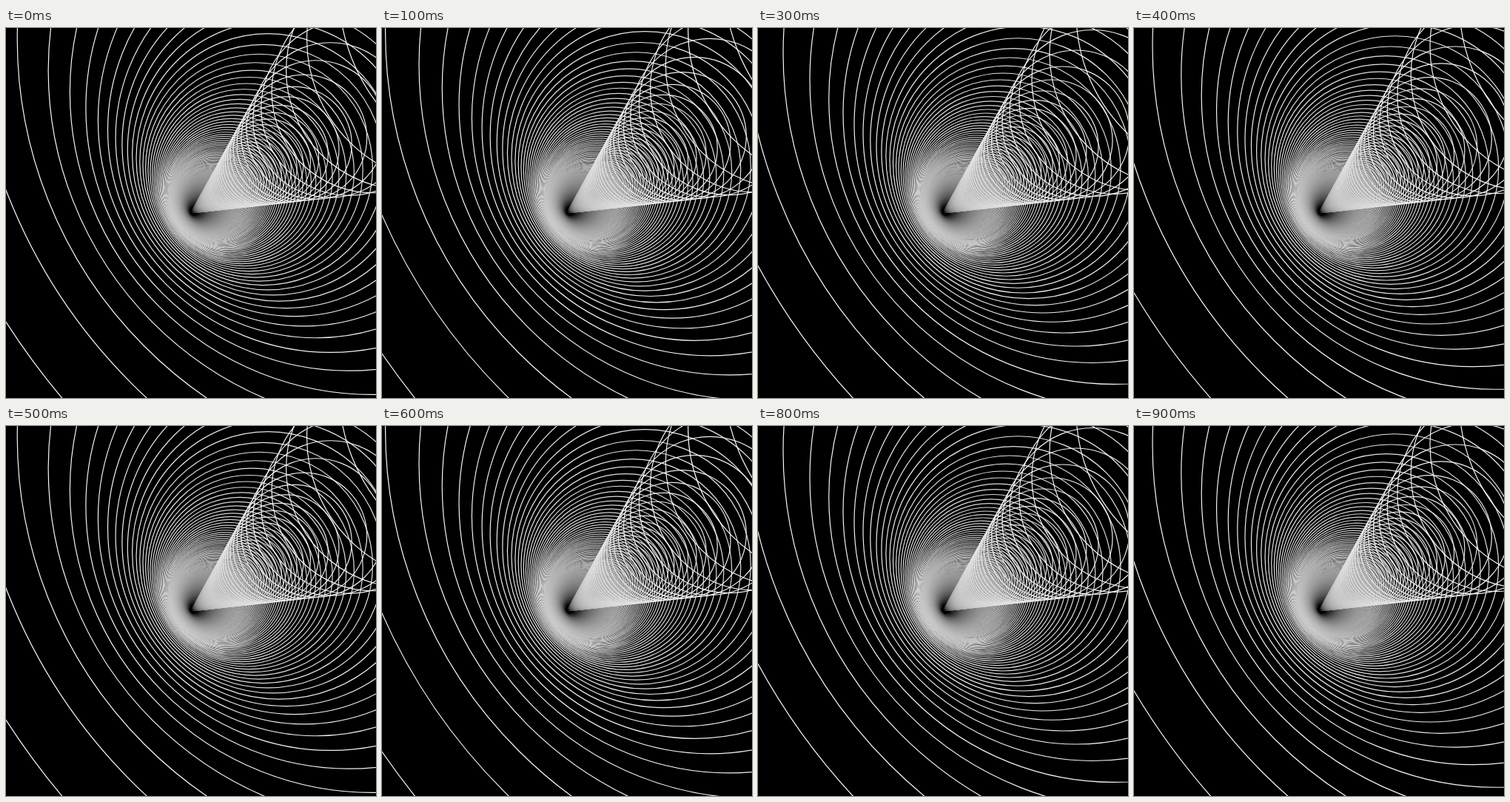
Recreate the animation shown at these times as an HTML page with a canvas. Size 500 by 500 pixels, loop 1 s.

```html
<!DOCTYPE html>
<html lang="en">
<head>
<meta charset="utf-8">
<title>Ring tunnel</title>
<style>
html, body { margin: 0; width: 100%; height: 100%; overflow: hidden; background: #000; }
canvas { display: block; width: 500px; height: 500px; }
</style>
</head>
<body>
<canvas id="stage" width="500" height="500"></canvas>
<script>
const ctx = document.getElementById('stage').getContext('2d');
const SIZE = 500;
const STEP = 100;        // ms per pose
const POSES = 5;         // poses until each ring reaches the next one
const RINGS = 400;
const FOG = 150;         // depth over which light falls to 1/e
const WIDE = 2700;       // radius of the outer tube at depth 1
const RADII = [WIDE, WIDE / 3];
const AXIS = { x: 0.6 * WIDE, y: -0.4 * WIDE };

function ring(z, radius) {
  ctx.beginPath();
  ctx.arc(SIZE / 2 + AXIS.x / z, SIZE / 2 + AXIS.y / z, radius / z, 0, Math.PI * 2);
  ctx.stroke();
}

function draw(ms) {
  const pose = Math.floor(ms / STEP) % POSES;
  const near = ((POSES + 3 - pose) % POSES) / POSES;
  ctx.fillStyle = '#000';
  ctx.fillRect(0, 0, SIZE, SIZE);
  ctx.lineWidth = 1.2;
  for (let i = RINGS; i >= 1; i--) {
    const z = i + near;
    const light = Math.round(255 * Math.exp(-z / FOG));
    ctx.strokeStyle = `rgb(${light},${light},${light})`;
    for (const radius of RADII) ring(z, radius);
  }
}

let start;
function tick(now) {
  start ??= now;
  draw(now - start);
  requestAnimationFrame(tick);
}
draw(0);
requestAnimationFrame(tick);
</script>
</body>
</html>
```
